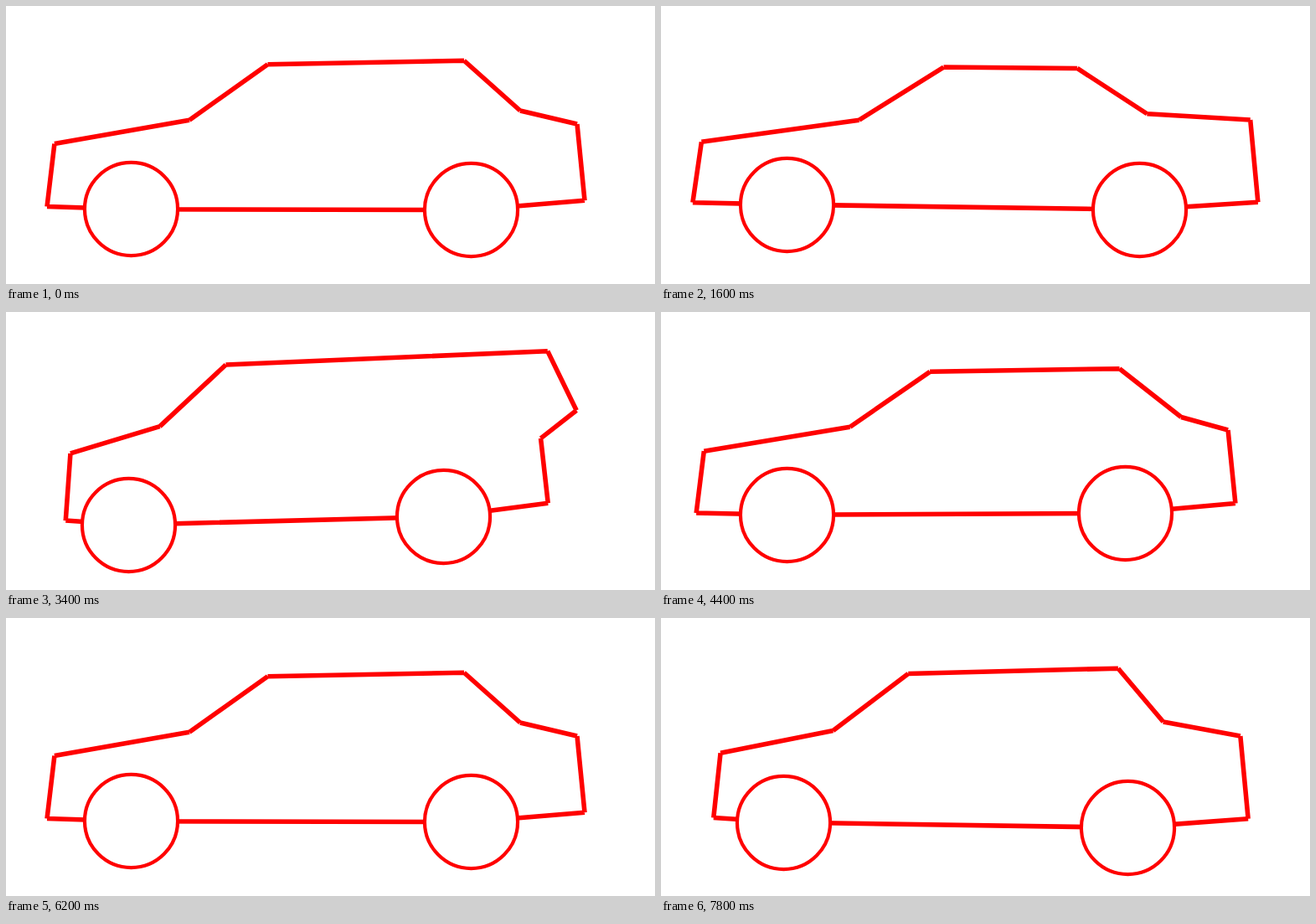
An HTML page for the animation above (8000 ms loop, 775x332 px).

```html
<!DOCTYPE html>
<html lang="en">
<head>
<meta charset="utf-8">
<title>Car shape modes</title>
<style>
  html, body { margin: 0; width: 100%; height: 100%; overflow: hidden; background: #fff; }
  svg { display: block; width: 100%; height: 100%; }
  path { fill: none; stroke: red; stroke-width: 5.56; }
  circle { fill: #fff; stroke: red; stroke-width: 4.17; }
</style>
</head>
<body>
<svg viewBox="0 0 775 332">
  <path id="body"/>
  <circle id="front" r="55.56"/>
  <circle id="rear" r="55.56"/>
</svg>
<script>
const STEP = 200, COUNT = 40;

// A landmark of the closed outline: mean position and its shift in each shape mode
const mark = (x, y, ...modes) => ({ x, y, modes });

const car = {
  front:      mark(149.4, 242.8, [3.2, -14.2], [6.3, -3.1]),
  bumper:     mark(49, 239.5, [-27.8, -12], [-34.4, 2.5]),
  nose:       mark(57.9, 164.5, [-23.8, -5.5], [-32.9, 8.2]),
  hood:       mark(219, 136.3, [44.2, -0.4], [33.7, 4.7]),
  windshield: mark(312.5, 69.7, [62.5, 8.3], [43.1, 8.2]),
  roof:       mark(547, 65.2, [-124.7, 23.1], [2.8, 12.5]),
  window:     mark(614, 125, [-84, 9.4], [35.6, 2.4]),
  trunk:      mark(682, 141, [54.3, -12.4], [-24.6, 0]),
  tail:       mark(691, 232.3, [54.7, 5.1], [-25.4, -18.6]),
  rear:       mark(555.4, 243.6, [41.1, -1], [-5, -16.9])
};

const el = id => document.getElementById(id);

// Each mode in turn swings out and back, then the other way;
// the shape rests one extra step at the first return
function weights(k) {
  const s = k > 10 ? k - 1 : k;
  const size = 1 - Math.abs(s % 10 - 5) / 5;
  const w = s % 20 < 10 ? size : -size;
  return s < 20 ? [w, 0] : [0, w];
}

function place({ x, y, modes }, w) {
  modes.forEach(([dx, dy], i) => { x += w[i] * dx; y += w[i] * dy; });
  return [x, y];
}

function draw(t) {
  const w = weights(Math.floor(t / STEP) % COUNT);
  const points = Object.values(car).map(p => place(p, w));

  // Separate segments keep the corners unjoined
  el("body").setAttribute("d", points.map((p, i) =>
    `M${p}L${points[(i + 1) % points.length]}`).join(""));

  for (const id of ["front", "rear"]) {
    const [x, y] = place(car[id], w).map(v => Math.floor(v) + 0.5);
    el(id).setAttribute("cx", x);
    el(id).setAttribute("cy", y);
  }
}

const start = performance.now();
function tick() {
  draw(performance.now() - start);
  requestAnimationFrame(tick);
}
tick();
</script>
</body>
</html>
```
